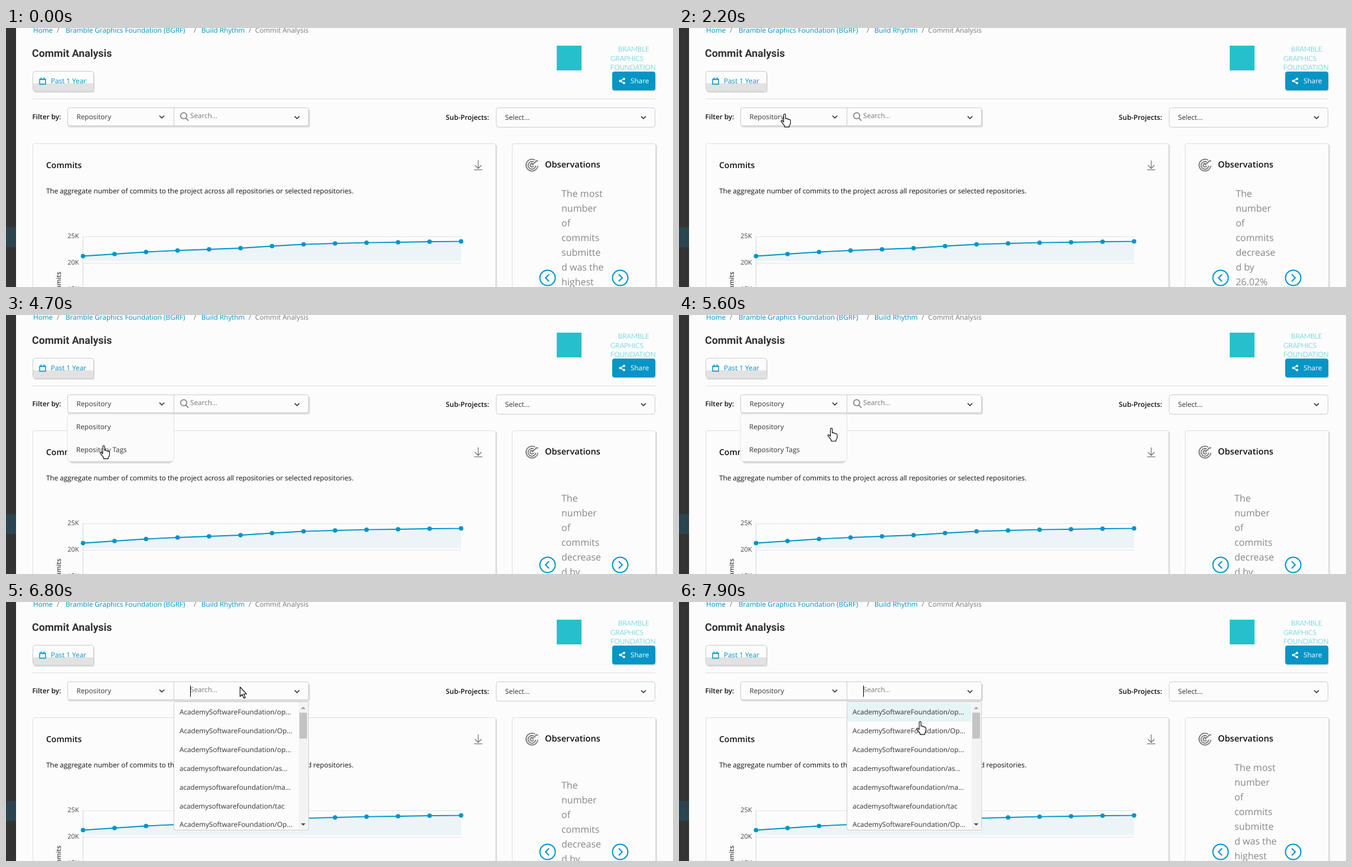
Write an HTML page that moves like this. It is 1130x440 px and loops after 8000 ms.

```html
<!DOCTYPE html>
<html lang="en">
<head>
<meta charset="utf-8">
<title>Commit Analysis</title>
<style>
html, body { margin: 0; width: 100%; height: 100%; overflow: hidden; background: #fcfcfc; }
svg { display: block; width: 1130px; height: 440px; }
text { font: 11.73px "Open Sans", sans-serif; fill: #333; text-rendering: geometricPrecision; }
.link text, text.link { fill: #0090c5; }
text.grey { fill: #777; }
text.label { font-weight: 600; fill: #111; }
text.title { font: 700 17.8px Roboto, sans-serif; }
text.head { font-size: 14px; font-weight: 600; fill: #111; }
text.axis { font-size: 11px; fill: #444; }
text.logo { font: 300 11.7px Lato, sans-serif; fill: #25c0cc; }
.slide text { font-size: 16px; fill: #888; }
.box { fill: #fcfcfc; stroke: #ccc; }
.card { stroke: #ddd; }
.shade { fill: #dedede; }
.icon { fill: none; stroke: #777; stroke-width: 1.3; }
.chev { fill: none; stroke: #222; stroke-width: 1.5; }
.blue { fill: none; stroke: #0094c8; stroke-width: 2; }
.thin { stroke-width: 1.5; }
#cursor path { fill: #fff; stroke: #000; stroke-width: 1.1; stroke-linejoin: round; }
</style>
</head>
<body>
<svg viewBox="0 0 1130 440">
  <defs>
    <clipPath id="view"><rect x="940" y="260" width="77" height="180"/></clipPath>
    <clipPath id="listClip"><rect x="285" y="170" width="226" height="216"/></clipPath>
  </defs>
  <rect width="1130" height="440" fill="#fcfcfc"/>
  <rect width="17" height="440" fill="#333"/>
  <rect y="338" width="17" height="34" fill="#2b4550"/>

  <g class="link">
    <text x="46" y="8">Home</text>
    <text x="101" y="8">Bramble Graphics Foundation (BGRF)</text>
    <text x="331" y="8">Build Rhythm</text>
  </g>
  <text class="grey" x="86" y="8">/</text>
  <text class="grey" x="318" y="8">/</text>
  <text class="grey" x="411" y="8">/</text>
  <text class="grey" x="422" y="8">Commit Analysis</text>
  <text class="title" x="44" y="49">Commit Analysis</text>

  <rect x="933" y="30" width="42" height="42" fill="#25c0cc"/>
  <text class="logo" x="1037" y="40">BRAMBLE</text>
  <text class="logo" x="1024" y="55.5">GRAPHICS</text>
  <text class="logo" x="1024" y="71">FOUNDATION</text>

  <rect class="shade" x="47" y="75" width="103" height="35" rx="4"/>
  <rect class="box" x="45.5" y="73.5" width="103" height="34" rx="4"/>
  <path d="M46 94h102v10q0 3-3 3H49q-3 0-3-3z" fill="#e2e2e2"/>
  <path class="blue thin" d="M57 87h10v8.500h-10zM57 87.500h10M59.500 84v3M64.500 84v3"/>
  <text class="link" x="76" y="94">Past 1 Year</text>

  <rect class="shade" x="1028" y="76" width="73" height="32" rx="4"/>
  <rect x="1027" y="74" width="73" height="32" rx="4" fill="#0795c6"/>
  <path d="M1047 86.500l-6.500 3.500l6.500 3.500" fill="none" stroke="#fff" stroke-width="1.500"/>
  <g fill="#fff"><circle cx="1047" cy="86.500" r="2"/><circle cx="1040.500" cy="90" r="2"/><circle cx="1047" cy="93.500" r="2"/></g>
  <text x="1058" y="94" style="fill:#fff">Share</text>
  <path d="M45 120.500H1100" stroke="#ddd"/>

  <text class="label" x="44.500" y="155">Filter by:</text>
  <rect class="shade" x="105" y="138" width="410" height="31" rx="4"/>
  <rect class="box" x="104.500" y="135.500" width="408" height="30.500" rx="3"/>
  <path d="M284.500 136v30" stroke="#ccc"/>
  <text x="119.500" y="155">Repository</text>
  <g id="lens" fill="none" stroke="#888" stroke-width="1.800"><circle cx="301" cy="149" r="5.200"/><path d="M304.500 153l4.500 4.500"/></g>
  <text class="grey" x="312" y="153">Search...</text>
  <path id="caret" d="M312.500 142v19" stroke="#000"/>
  <text class="label" x="745" y="156">Sub-Projects:</text>
  <rect class="box" x="830.500" y="135.500" width="269" height="33" rx="4"/>
  <text x="845.500" y="156">Select...</text>
  <path class="chev" d="M260 149l4 4l4-4M489 150l4 4l4-4M1076 150l4 4l4-4"/>

  <rect class="shade" x="47" y="198" width="785" height="260" rx="3"/>
  <rect class="box card" x="45.500" y="196.500" width="784" height="260" rx="3"/>
  <rect class="shade" x="859" y="198" width="244" height="260" rx="3"/>
  <rect class="box card" x="857.500" y="196.500" width="243" height="260" rx="3"/>
  <text class="head" x="68" y="238">Commits</text>
  <path class="icon" d="M800 225v13.500M794.500 233l5.500 5.500l5.500-5.500M793 240.800h14"/>
  <text x="68" y="281" style="fill:#111">The aggregate number of commits to the project across all repositories or selected repositories.</text>

  <path d="M130 354.500H771M130 399.500H771" stroke="#e0e3ec"/>
  <path d="M130.500 354V440" stroke="#ccd6eb"/>
  <path id="area" fill="#ecf4f8"/>
  <path id="line" class="blue" style="stroke-width:1.8"/>
  <g id="dots" fill="#0094c8"></g>
  <text class="axis" x="123.500" y="357" text-anchor="end">25K</text>
  <text class="axis" x="123.500" y="402" text-anchor="end">20K</text>
  <text class="axis" x="123.500" y="447" text-anchor="end">15K</text>
  <text class="axis" transform="translate(93 414) rotate(-90)" text-anchor="end" style="font-weight:600">Commits</text>

  <path class="icon" style="stroke-width:1.8" d="M896.500 224.500A10 10 0 1 0 901 234M894 227.500A6.500 6.500 0 1 0 897.500 234M892 230.200A3 3 0 1 0 894 234M891 233l8-7.500l2.500.5"/>
  <text class="head" x="913" y="237" style="font-size:14.6px">Observations</text>
  <g clip-path="url(#view)"><g class="slide" id="most"></g><g class="slide" id="fewer"></g></g>
  <g class="blue"><circle cx="917.500" cy="424.500" r="13"/><path d="M920 418.500l-6 6l6 6"/><circle cx="1040.500" cy="424.500" r="13"/><path d="M1038 418.500l6 6l-6 6"/></g>

  <g id="menu">
    <rect x="106" y="172" width="177" height="80" rx="7" fill="#d8d8d8"/>
    <rect x="104" y="168" width="180.500" height="80.500" rx="5" fill="#fbfbfb" stroke="#e2e2e2"/>
    <text x="119" y="194">Repository</text>
    <text x="119" y="233">Repository Tags</text>
  </g>

  <g id="list">
    <rect class="box" x="284.500" y="169.500" width="228" height="218" rx="2"/>
    <rect id="hover" x="285" y="171" width="210" height="32" fill="#e7f4f6"/>
    <g id="rows" clip-path="url(#listClip)"></g>
    <rect x="496" y="171" width="15.500" height="215" fill="#f3f3f3"/>
    <rect x="497" y="188" width="13" height="44" fill="#c3c3c3"/>
    <path d="M499.500 182l4-4l4 4z" fill="#a3a3a3"/>
    <path d="M499.500 376l4 4l4-4z" fill="#505050"/>
  </g>

  <g id="cursor">
    <path id="arrow" d="M0 0V16L3.700 12.500L6.500 19L9 18L6.200 11.700H11z"/>
    <path id="hand" d="M-1.500 1q1.500-2 3 0v7q2.500-1 3 .8q2.300-.6 2.800 .8q2.300-.3 2.500 1.500v5q0 2-2 4v2h-8v-2l-5.500-7q-.5-2.500 2-1.500l2 2.200z"/>
    <path id="beam" d="M-3-8h2.500l.5.500l.5-.5H3M0-8V8M-3 8h2.500l.5-.5l.5.500H3" style="fill:none"/>
  </g>
</svg>
<script>
const $ = id => document.getElementById(id);
const show = (id, on) => $(id).style.display = on ? '' : 'none';
const place = (id, x, y) => $(id).setAttribute('transform', `translate(${x} ${y})`);
const stack = (id, lines, x, y, gap) => $(id).innerHTML =
  lines.map((s, i) => `<text x="${x}" y="${y + i * gap}">${s}</text>`).join('');

stack('most', ['The most', 'number', 'of', 'commits', 'submitte', 'd was the', 'highest'], 0, 0, 25);
stack('fewer', ['The', 'number', 'of', 'commits', 'decrease', 'd by', '26.02%'], 0, 0, 25);
const org = 'AcademySoftwareFoundation/', low = org.toLowerCase();
stack('rows', [org + 'op...', org + 'Op...', org + 'op...', low + 'as...', low + 'ma...', low + 'tac', org + 'Op...'],
  294, 191, 31.9);

const points = [387.5, 384, 380.5, 378, 376, 374, 370.5, 367.5, 366, 364.7, 364, 363, 362.6]
  .map((y, i) => [130.5 + i * 53.37, y]);
const trace = 'M' + points.join('L');
$('line').setAttribute('d', trace);
$('area').setAttribute('d', trace + 'V396H130.5z');
$('dots').innerHTML = points.map(([x, y]) => `<circle cx="${x}" cy="${y}" r="3.8"/>`).join('');

// Pointer stops: time, x, y
const stops = [
  [100, 160, -25], [900, 39, 149], [1100, 52, 150], [1400, 62, 150], [1600, 62, 150],
  [2200, 179, 146], [2400, 180, 146], [3300, 180, 146], [3700, 167.5, 182], [3900, 167, 188],
  [4300, 167, 188], [4700, 165.5, 222], [4800, 165.5, 223], [5400, 165.5, 223], [5900, 397, 146],
  [6100, 397, 146], [6300, 396.5, 144.5], [7000, 396.5, 144.5], [7300, 409.5, 164.5],
  [7600, 409, 186], [7700, 409, 186], [7900, 408.5, 203]
];

function pointer(t) {
  const i = stops.findIndex(s => s[0] > t);
  if (i === 0) return stops[0].slice(1);
  if (i < 0) return stops[stops.length - 1].slice(1);
  const [t0, x0, y0] = stops[i - 1], [t1, x1, y1] = stops[i];
  const k = (t - t0) / (t1 - t0);
  return [x0 + (x1 - x0) * k, y0 + (y1 - y0) * k];
}

// Standard CSS "ease" curve
function ease(x) {
  if (x <= 0) return 0;
  if (x >= 1) return 1;
  let a = 0, b = 1, u;
  for (let i = 0; i < 20; i++) {
    u = (a + b) / 2;
    if (.75 * u * (1 - u) + u ** 3 < x) a = u; else b = u;
  }
  return .3 * u * (1 - u) ** 2 + 3 * u * u * (1 - u) + u ** 3;
}

function draw(now) {
  const t = Math.floor(now % 8000 / 100) * 100;
  const second = t > 5000;
  const left = 941 - 76 * ease((t - (second ? 6950 : 1690)) / 650);
  const y = t >= 2400 && t < 6900 ? 317 : 287;
  place(second ? 'fewer' : 'most', left, y);
  place(second ? 'most' : 'fewer', left + 76, y);

  const open = t >= 6600;
  show('menu', t >= 2900 && !open);
  show('list', open);
  show('lens', !open);
  show('caret', open && (t < 7100 || t >= 7600));

  const [px, py] = pointer(t);
  place('cursor', px, py);
  const overRow = open && py > 170;
  const overMenu = px > 104 && px < 284 && py > 135 && t < 5900;
  const beam = t >= 800 && t < 1700;
  show('hover', overRow);
  show('hand', overRow || overMenu);
  show('beam', beam);
  show('arrow', !overRow && !overMenu && !beam);
  requestAnimationFrame(draw);
}
requestAnimationFrame(draw);
</script>
</body>
</html>
```
